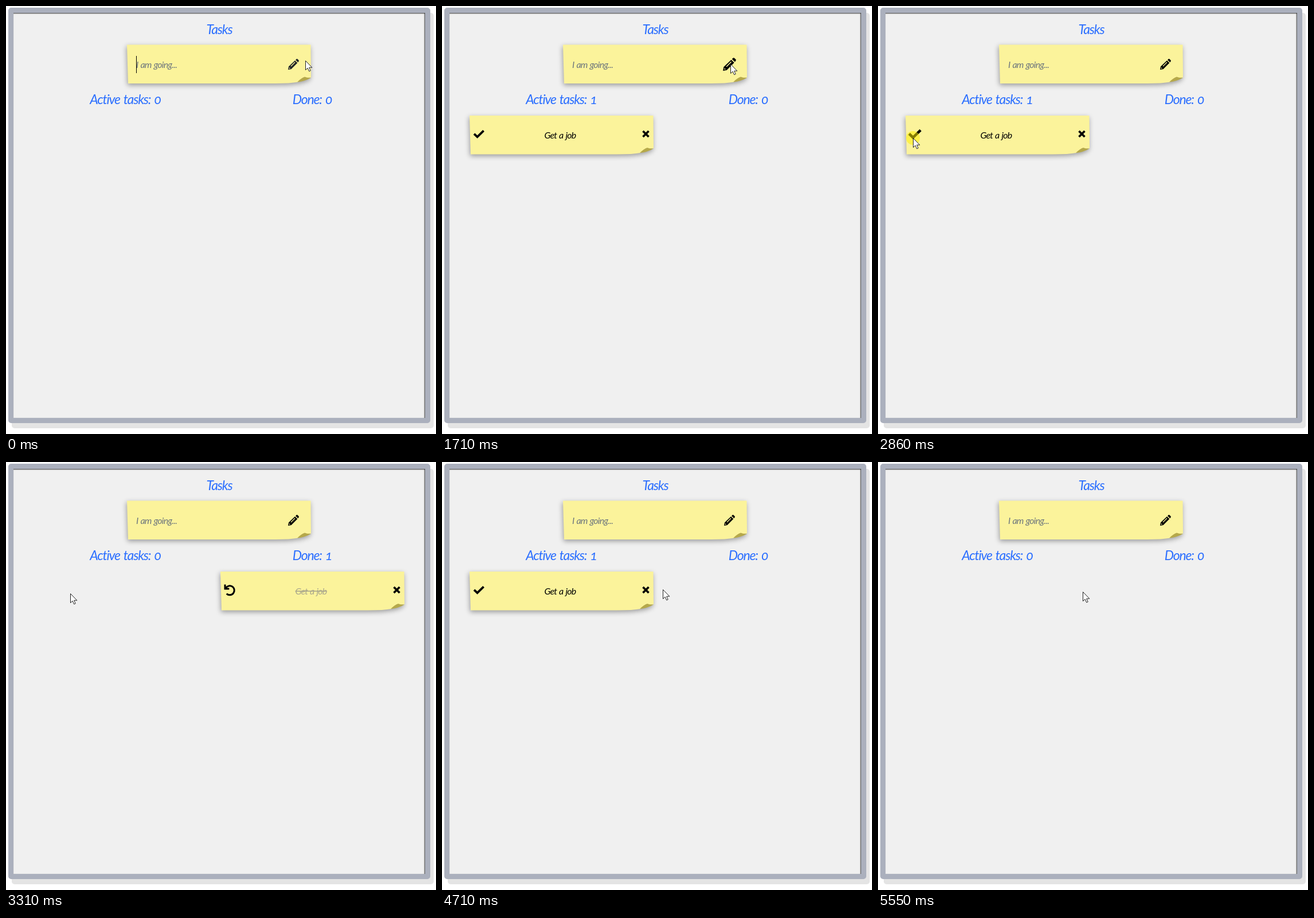
Write an HTML page that moves like this. It is 750x746 px and loops after 5710 ms.

```html
<!DOCTYPE html>
<html lang="en">
<head>
<meta charset="utf-8">
<title>Tasks</title>
<style>
html, body { margin: 0; width: 100%; height: 100%; overflow: hidden; background: #fff; }
#board {
  position: absolute; left: 4px; top: 3px; width: 736px; height: 724px; box-sizing: border-box;
  border: 9px solid #abb0bd; border-radius: 5px; background: #f0f0f0;
  box-shadow: 6px 9px #e4e4e4, inset -1px 1px 2px #333;
}
svg { position: absolute; left: 0; top: 0; }
text { font: italic 16px Lato, sans-serif; letter-spacing: -.8px; word-spacing: 1px; white-space: pre; }
.title {
  font-size: 23px; letter-spacing: -1.2px; word-spacing: 2px; fill: #2a6eff;
  font-variant-numeric: oldstyle-nums;
}
.mid { text-anchor: middle; }
.paper { filter: drop-shadow(-1px 3px 4px rgba(0, 0, 0, .36)); }
.line { fill: none; stroke: #000; }
</style>
</head>
<body>
<div id="board"></div>
<svg width="750" height="746" viewBox="0 0 750 746">
  <defs>
    <g id="note">
      <g class="paper">
        <path fill="#fbf39b" d="M0 0H320.5L321 57Q314 57 309 60L298 65Q285 67.5 258 67.5H2Z"/>
        <path fill="#b5a84a" d="M297 65Q304 58 310 56Q315 58 321 57.5Q310 64 297 65Z"/>
      </g>
    </g>
    <path id="cross" class="line" stroke-width="3.6" d="M-5-5 5 5M5-5-5 5"/>
  </defs>

  <text class="title mid" x="372" y="49">Tasks</text>
  <text class="title mid" id="active" x="208" y="171"></text>
  <text class="title mid" id="done" x="534" y="171"></text>

  <use href="#note" x="211" y="67.5"/>
  <text id="input" x="227" y="108"></text>
  <path id="caret" class="line" d="M.5 87V117"/>
  <g id="pen">
    <path d="M-9.5 9.5-8.5 4 2.5-6.5 6.8-2.2-4 8.5ZM3.6-7.6 5-9Q6-9.8 7-9L9-7Q9.8-6 9-5L7.8-3.3Z"/>
    <path d="M-4.5 3.5 2.5-3.5M-7.5 6.2-6.2 7.5" stroke="#fbf39b" stroke-width="1.3"/>
  </g>

  <g id="task">
    <use href="#note"/>
    <text class="mid" id="label" x="158" y="39.5">Get a job</text>
    <use href="#cross" id="remove"/>
    <path id="check" class="line" stroke-width="3.8" d="M-8.3-.2-2.7 5.2 8.3-5.6"/>
    <path id="undo" class="line" stroke-width="3" d="M-8.3-9.5V-2H-1M-7.2-2.8A8 8 0 1 1-5.6 6.6"/>
  </g>

  <circle id="click" r="12" fill="#ffee00" fill-opacity=".52"/>
  <path id="cursor" fill="#fff" stroke="#222" d="M0 0V16L3.6 12.6 6.2 18.3 8.7 17.2 6.2 11.7H11.3Z"/>
</svg>
<script>
const LOOP = 5710, STEP = 77.2;
const $ = id => document.getElementById(id);
const keyTimes = [80, 160, 310, 390, 470, 630, 700, 940, 1020];
const clicks = [[1560, 1710], [2780, 2930], [4010, 4090], [5390, 5550]];
// time, x, y of the pointer tip
const path = [
  [0, 522, 95], [1080, 522, 95], [1235, 517, 96], [1490, 503, 101], [1870, 503, 101],
  [2470, 65, 227], [2780, 61, 230], [3090, 61, 230], [3700, 390, 222], [3850, 394, 222],
  [4630, 394, 222], [4700, 385, 222], [4900, 367, 233], [5090, 357, 226], [LOOP, 357, 226]
];

function pointer(t) {
  const i = path.findIndex(k => k[0] > t);
  const [t0, x0, y0] = path[i - 1], [t1, x1, y1] = path[i];
  const u = (t - t0) / (t1 - t0), e = u * u * (3 - 2 * u);
  return [x0 + (x1 - x0) * e, y0 + (y1 - y0) * e];
}

const show = (id, on) => $(id).setAttribute("visibility", on ? "visible" : "hidden");
const move = (id, x, y, s = 1) => $(id).setAttribute("transform", `translate(${x} ${y}) scale(${s})`);

function draw(now) {
  const t = now % LOOP;
  const [px, py] = pointer(Math.floor(t / STEP) * STEP);
  // Icons grow under the pointer; (ox, oy) is the parent's offset.
  const icon = (id, x, y, ox = 0, oy = 0) => {
    const over = Math.abs(px - x - ox) < 11 && Math.abs(py - y - oy) < 11;
    move(id, x, y, over ? 1.2 : 1);
  };

  const typed = t < 1710 ? "Get a job".slice(0, keyTimes.filter(k => k <= t).length) : "";
  const input = $("input");
  input.textContent = typed || "I am going...";
  input.setAttribute("fill", typed ? "#000" : "#6c757d");
  move("caret", Math.round(227 + (typed ? input.getComputedTextLength() : 0)), 0);
  show("caret", t < 1560);
  icon("pen", 501.5, 101.5);
  $("pen").setAttribute("fill", t < 1490 ? "#212529" : "#000");

  const exists = t >= 1710 && t < 5550;
  const isDone = t >= 2930 && t < 4170;
  const left = isDone ? 374 : 48, top = 191;
  $("active").textContent = "Active tasks: " + +(exists && !isDone);
  $("done").textContent = "Done: " + +isDone;
  move("task", left, top);
  $("task").style.display = exists ? "" : "none";
  $("label").setAttribute("fill", isDone ? "#aaa78c" : "#000");
  $("label").setAttribute("text-decoration", isDone ? "line-through" : "none");
  icon("remove", 307.5, 32, left, top);
  icon("check", 16.3, 32, left, top);
  icon("undo", 16.3, 32, left, top);
  show("check", !isDone);
  show("undo", isDone);

  show("click", clicks.some(([a, b]) => t >= a && t < b));
  move("click", px, py);
  move("cursor", Math.round(px) + .5, Math.round(py) + .5);
}

const start = performance.now();
function frame() {
  draw(performance.now() - start);
  requestAnimationFrame(frame);
}
frame();
</script>
</body>
</html>
```
